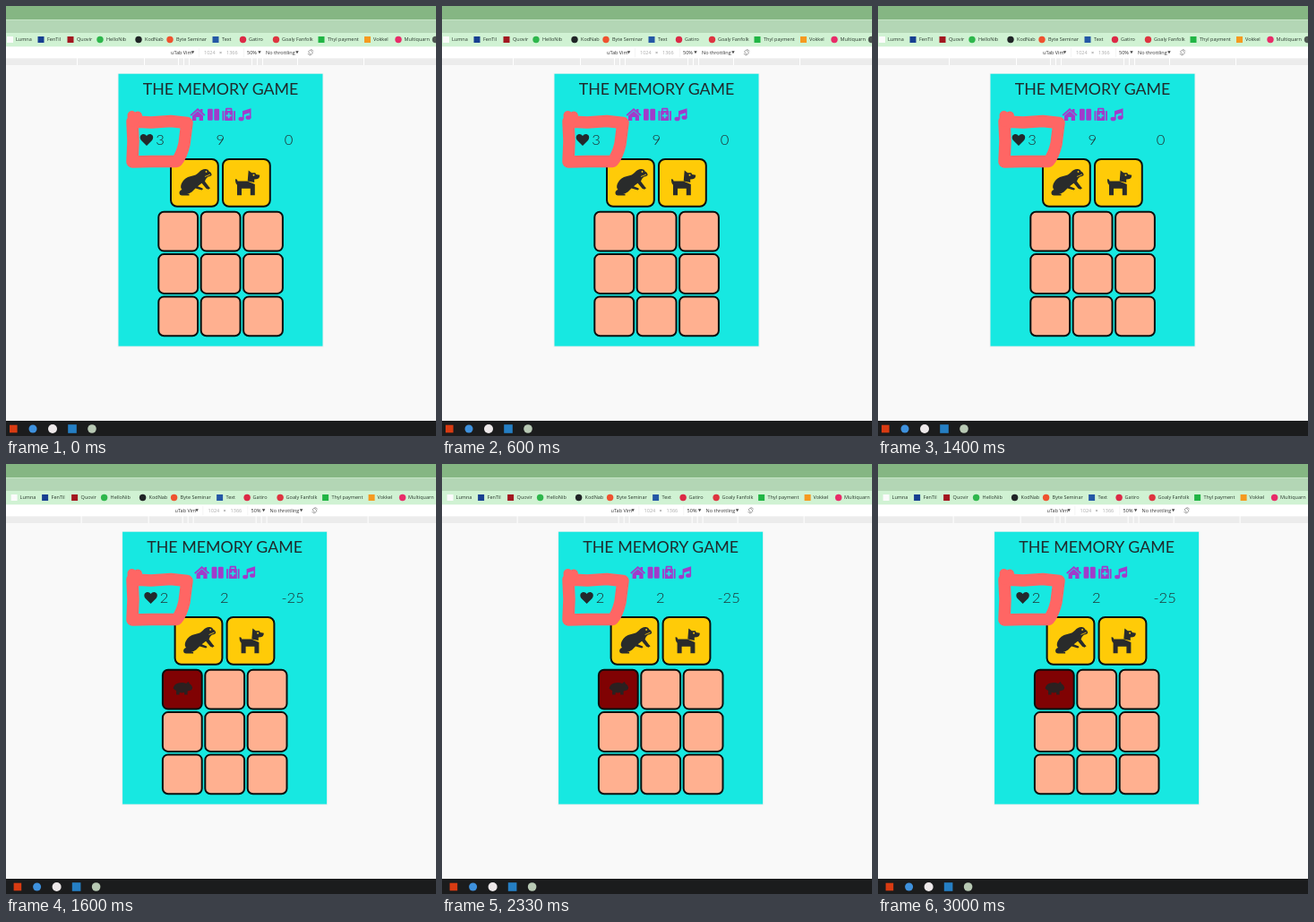
An HTML page for the animation above (3.07 s loop, 480 by 480 pixels).

```html
<!DOCTYPE html>
<html lang="en">
<head>
<meta charset="utf-8">
<title>Memory game</title>
<style>
html, body { margin: 0; width: 100%; height: 100%; overflow: hidden; background: #f9f9f9; }
svg { display: block; width: 100vw; height: 100vh; }
.ui { font-family: "Open Sans", "Noto Sans", sans-serif; font-size: 5.5px; fill: #28382c; }
.game { font-family: Lato, "Open Sans", sans-serif; fill: #202a2c; text-anchor: middle; }
.count { font-size: 16.5px; font-weight: 300; }
.card { stroke: #08100f; stroke-width: 2; }
</style>
</head>
<body>
<svg viewBox="0 0 480 480">
  <rect width="480" height="480" fill="#f9f9f9"/>
  <rect width="480" height="30" fill="#b3d6b5"/>
  <rect width="480" height="15" fill="#85b683"/>
  <rect y="15" width="480" height="1" fill="#c4e4c5"/>
  <rect y="30" width="480" height="15.500" fill="#d0f2d3"/>
  <rect y="45.5" width="480" height="13" fill="#fff"/>
  <rect y="58.5" width="480" height="7.500" fill="#ececec"/>
  <rect y="463" width="480" height="17" fill="#1b1c1d"/>

  <g id="scene">
    <g id="bookmarks" class="ui"></g>
    <g id="toolbar" class="ui"></g>
    <g id="ruler" fill="#fff"></g>
    <g id="taskbar"></g>

    <rect x="124.5" y="75" width="230" height="306" fill="#f1f1f1"/>
    <rect x="125.5" y="75.7" width="228" height="304" fill="#17e8e1"/>
    <g class="game">
      <text x="239.5" y="98.5" font-size="17.8">THE MEMORY GAME</text>
      <text id="lives" class="count" x="172" y="154.8"></text>
      <text id="moves" class="count" x="239.3" y="154.8"></text>
      <text id="score" class="count" x="315.5" y="154.8"></text>
    </g>
    <path fill="#23292c" d="M157 156l-6-6c-2-2.500-1.500-6 1.200-6.800 2-.6 3.700.4 4.800 1.900 1.100-1.500 2.800-2.500 4.800-1.900 2.700.8 3.200 4.300 1.200 6.800z"/>

    <g fill="#a03bcb">
      <path d="M205.500 121.500l8.500-7.500 3 2.600v-1.600h2.500v3.800l3 2.700-1.300 1.300-7.200-6.300-7.200 6.300z"/>
      <path d="M208 122.400l6-5.200 6 5.200v5.600h-4.300v-4h-3.400v4H208z"/>
      <rect x="225" y="114.700" width="5.800" height="13" rx="1.200"/>
      <rect x="232.300" y="114.700" width="5.800" height="13" rx="1.200"/>
      <path d="M245 117v-2q0-1.200 1.200-1.200h5q1.200 0 1.200 1.200v2h-1.700v-1.600h-4V117z"/>
      <rect x="241.500" y="117" width="1.800" height="11" rx=".8"/>
      <rect x="244.200" y="117" width="9" height="11"/>
      <rect x="254.200" y="117" width="1.800" height="11" rx=".8"/>
      <path d="M264 117.300l9.500-3v10.400h-1.600v-5.500l-6.300 2v5.300H264z"/>
      <ellipse cx="262.500" cy="126" rx="3" ry="2.300"/>
      <ellipse cx="270.500" cy="124.500" rx="3" ry="2.300"/>
    </g>
    <path d="M248.700 119.300v6M245.700 122.300h6" stroke="#17e8e1" stroke-width="1.700"/>

    <g id="cards"></g>

    <g fill="#292b2b">
      <path d="M193.500 208.500q0-2.500 3-3.500-2.500-2.500-.5-7 3-6.500 10.500-8 6-1 9-4.500 3-3.800 7.500-3.500 3 .3 3.800 2.700 3 1.300 2.700 4.300-1 1.300-4.300 1.800-3 2.500-3.200 5l4.500 6 1.500 1.500-2 1.500-2.500-1-5-6-4.500 3.500 5.500 2.200q1 1.500-1 2l-7-2-4 4q-2.500 2-5.500 2.300h2.500v1.600h-8q-3 0-3-2.900z"/>
      <path d="M269.700 195.500l1-12 3.500 2.800h4l1 1.700 4 .8q0 4-3.500 4.500l-2.500.2v3.500z"/>
      <path d="M256 193.300q2.300-.5 2.600 2.300h10.700l8.500 3.400v12.200h-5v-7.500h-9.800v7.500h-5v-11.500q-2.300-2-2-6.400z"/>
    </g>
    <g fill="#ffcb08"><circle cx="223.500" cy="185" r=".9"/><circle cx="276.500" cy="188.800" r="1"/></g>
    <path d="M222 190.500l6-2.500" fill="none" stroke="#ffcb08" stroke-width=".8"/>

    <path id="pig" fill="#2b2020" d="M182 250.500q1-5 6-6 5-1 8.500.5l2.500-2 1.300 2.300q2.700 1.200 3.200 4.200 0 3-3.500 3.500l-2 .5v4h-3.500v-2.500q-3 .8-5.500 0v2.500h-3.500V253q-2-1-3.500-2.500z"/>
  </g>

  <g fill="none" stroke="#ff6664" stroke-linecap="round" stroke-linejoin="round">
    <path stroke-width="13.500" d="M141 129L142 151 141 174 162 173.500 190.500 173.500Q196 167 199 154L202 130.500 184 128.500 162 130 142 129"/>
    <path stroke-width="10" d="M140.500 122L141 130M147 122.500L143 129"/>
  </g>
</svg>
<script>
const LOOP = 3070, FLIP = 1530, SHIFT = 4.6;
const byId = id => document.getElementById(id);

function add(parent, tag, attrs, text = "") {
  const el = document.createElementNS("http://www.w3.org/2000/svg", tag);
  for (const key in attrs) el.setAttribute(key, attrs[key]);
  el.textContent = text;
  return byId(parent).appendChild(el);
}

function mark(parent, x, y, r, fill, round) {
  return round
    ? add(parent, "circle", { cx: x, cy: y, r, fill })
    : add(parent, "rect", { x: x - r, y: y - r, width: 2 * r, height: 2 * r, fill });
}

// [label, text x, icon x, icon colour, round icon]
[
  ["Lumna", 11, 4.5, "#fbfbfb", 0],
  ["FenTil", 46, 39, "#173f91", 0],
  ["Quovir", 79, 72, "#a31720", 0],
  ["HelloNib", 112, 105, "#2eb74c", 1],
  ["KodNab", 155, 148, "#202426", 1],
  ["Byte Seminar", 190, 183, "#ef522f", 1],
  ["Text", 241, 234, "#2458a6", 0],
  ["Gatiro", 271, 264.5, "#dc2946", 1],
  ["Goaly Fanfolk", 308, 301.5, "#de3440", 1],
  ["Thyl payment", 359, 352, "#21b545", 0],
  ["Vokkel", 410, 403.5, "#f59a20", 0],
  ["Multiquarn", 444.5, 438, "#e82c69", 1],
  ["", 490, 479.5, "#4d5651", 1]
].forEach(([label, x, iconX, color, round]) => {
  mark("bookmarks", iconX, 37.5, round ? 3.7 : 3.5, color, round);
  add("bookmarks", "text", { x, y: 39.3 }, label);
});

[
  ["uTab Vim", 184, "#333"], ["1024", 221, "#aaa"], ["×", 238, "#777"],
  ["1366", 246, "#aaa"], ["50%", 269, "#333"], ["No throttling", 290, "#333"]
].forEach(([label, x, fill]) => add("toolbar", "text", { x, y: 53.8, style: `fill:${fill}` }, label));
[208.5, 283, 325].forEach(x => add("toolbar", "path", { d: `M${x - 1.7} 50.3h3.4l-1.7 3z`, fill: "#444" }));
[215, 265].forEach(x => add("toolbar", "rect", { x, y: 47, width: 0.6, height: 10, fill: "#eee" }));
add("toolbar", "path", {
  d: "M337.500 51l2-2 3 3-2 2.500zM337 53q1 2 3 2M340 48.500q2 0 3 2",
  fill: "none", stroke: "#777", "stroke-width": 0.7
});

[79, 154, 192, 198, 204, 274, 280, 286, 325, 399].forEach(x =>
  add("ruler", "rect", { x, y: 58, width: 1, height: 8 }));

mark("taskbar", 8.3, 472, 4.3, "#d83b12", 0);
mark("taskbar", 30, 472, 4.5, "#3e91dd", 1);
mark("taskbar", 52, 472, 5, "#eee9ea", 1);
mark("taskbar", 74, 472, 4.8, "#257fc4", 0);
mark("taskbar", 96, 472, 4.8, "#b8c9b4", 1);

function card(x, y, size, rx, fill) {
  return add("cards", "rect", { x, y, width: size, height: size, rx, fill, class: "card" });
}
card(184, 171, 52.8, 7, "#ffcb08");
card(242, 171, 52.8, 7, "#ffcb08");
const grid = Array.from({ length: 9 }, (_, i) =>
  card(170.3 + (i % 3) * 47.4, 229.8 + Math.floor(i / 3) * 47.3, 43.8, 6, "#ffb090"));

function render(time) {
  const missed = time % LOOP >= FLIP;
  byId("scene").setAttribute("transform", `translate(${missed ? SHIFT : 0} 0)`);
  byId("lives").textContent = missed ? "2" : "3";
  byId("moves").textContent = missed ? "2" : "9";
  byId("score").textContent = missed ? "-25" : "0";
  grid[0].setAttribute("fill", missed ? "#800203" : "#ffb090");
  byId("pig").setAttribute("visibility", missed ? "visible" : "hidden");
}

const start = performance.now();
function tick() {
  render(performance.now() - start);
  requestAnimationFrame(tick);
}
tick();
</script>
</body>
</html>
```
